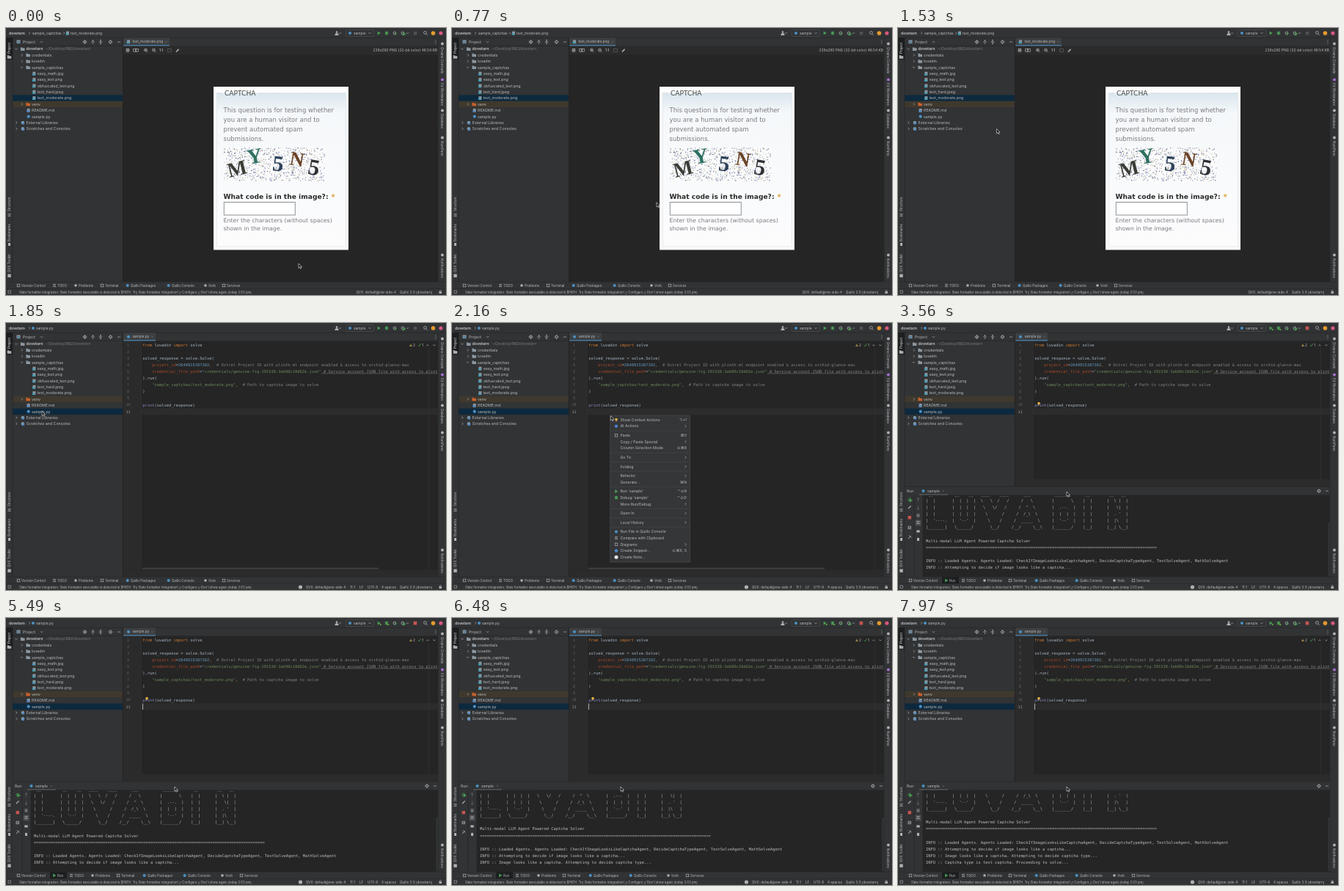
An HTML page that plays this animation: 600 px wide and 364 px high, repeating every 8 s.

```html
<!DOCTYPE html>
<html lang="en">
<head>
<meta charset="utf-8">
<title>IDE session</title>
<style>
html, body { margin: 0; width: 100%; height: 100%; overflow: hidden; background: #252525; }
svg { display: block; width: 100vw; height: 100vh; }
text { white-space: pre; font-family: Inter, "DejaVu Sans", sans-serif; }
.mono { font-family: "DejaVu Sans Mono", monospace; }
.form { font-family: "DejaVu Sans", sans-serif; }
.serif { font-family: "Liberation Serif", serif; font-weight: bold; }
.bold { font-weight: bold; }
</style>
</head>
<body>
<svg id="stage" viewBox="0 0 600 364"></svg>
<script>
const LOOP = 8000, PANEL = '#313335', EDITOR = '#252525', STRIP = '#2b2b2b', EDGE = '#232425',
      THUMB = '#3c3d3e', INK = '#bbbbbb', ICON = '#afb1b3', GREEN = '#499c54', RED = '#c75450', BLUE = '#4a88c7';
const OPEN_FILE = 1800, MENU = 2110, HOVER = 2430, RUN = 2700, OUTPUT = 3150;
const REPLIES = [6000, 7200];

// Drawing helpers; text is placed by its vertical centre.
const esc = s => s.replace(/&/g, '&amp;').replace(/</g, '&lt;');
const rect = (x, y, w, h, fill, extra = '') =>
  `<rect x="${x}" y="${y}" width="${w}" height="${h}" fill="${fill}" ${extra}/>`;
const dot = (x, y, r, fill, extra = '') => `<circle cx="${x}" cy="${y}" r="${r}" fill="${fill}" ${extra}/>`;
const line = (d, color = ICON, w = .7) => `<path d="${d}" fill="none" stroke="${color}" stroke-width="${w}"/>`;
const shape = (d, fill) => `<path d="${d}" fill="${fill}"/>`;
const text = (x, y, s, size = 5.25, fill = INK, cls = '', extra = '') =>
  `<text x="${x}" y="${y + size * .36}" font-size="${size}" fill="${fill}" class="${cls}" ${extra}>${esc(s)}</text>`;
const rightText = (x, y, s, size, fill) => text(x, y, s, size, fill, '', 'text-anchor="end"');
const turned = (x, y, angle, s, fill) =>
  `<g transform="translate(${x} ${y}) rotate(${angle})">${text(0, 0, s, 4.5, fill)}</g>`;
const group = (id, body) => `<g id="${id}">${body}</g>`;

const icons = {
  right: (x, y) => line(`M${x - .8} ${y - 1.6}l1.6 1.6l-1.6 1.6`),
  down: (x, y) => line(`M${x - 1.6} ${y - .8}l1.6 1.6l1.6 -1.6`),
  folder: (x, y, c = '#8d979f') => shape(`M${x - 2.8} ${y - 2.2}h2.2l.8 .9h2.6v3.6h-5.6z`, c),
  image: (x, y) => rect(x - 2, y - 2.4, 4, 4.8, '#8d979f') + rect(x - 2.5, y, 3.6, 2.3, '#3f9fb5'),
  python: (x, y) => dot(x, y, 2.1, '#4b8fc0'),
  doc: (x, y) => rect(x - 2, y - 2.4, 4, 4.8, '#8d979f') + rect(x - 2.5, y, 3.8, 2.2, BLUE),
  close: (x, y) => line(`M${x - 1} ${y - 1}l2 2m0 -2l-2 2`, '#6c6f71', .5),
  minus: (x, y) => line(`M${x - 2} ${y}h4`),
  ring: (x, y, c = ICON) => dot(x, y, 1.9, 'none', `stroke="${c}" stroke-width=".8"`),
  gear: (x, y) => icons.ring(x, y) + line(`M${x} ${y - 2.8}v5.6M${x - 2.8} ${y}h5.6`, ICON, .5) + dot(x, y, .8, PANEL),
  play: (x, y) => shape(`M${x - 1.8} ${y - 2.4}l4.2 2.4l-4.2 2.4z`, GREEN),
  bug: (x, y) => `<ellipse cx="${x}" cy="${y}" rx="1.8" ry="2.4" fill="${GREEN}"/>` +
    line(`M${x - 2.7} ${y - 1.3}h5.4M${x - 2.7} ${y + 1.3}h5.4`, GREEN, .5),
  box: (x, y) => rect(x - 1.8, y - 1.8, 3.6, 3.6, 'none', `stroke="${ICON}" stroke-width=".7"`),
  bars: (x, y) => line(`M${x - 2} ${y - 1.6}h4m-4 1.6h4m-4 1.6h4`),
  bulb: (x, y) => dot(x, y - .5, 1.8, '#f0b040') + rect(x - .8, y + 1.3, 1.6, 1.1, ICON),
};

function frameBars() {
  const out = [rect(0, 0, 600, 13, PANEL), rect(0, 13, 9, 333, PANEL), rect(589, 13, 11, 333, PANEL),
    rect(0, 346, 600, 18, PANEL), rect(0, 13, 9, 30, '#1d1e1f'),
    line('M0 13H600M9 13V346M589 13V346M0 346H600M0 355.3H600', EDGE, .5),
    text(4, 7, 'dovetarn', 5, INK, 'bold')];
  out.push(icons.right(32, 7), dot(451, 5.6, 1.3, ICON), shape('M448.4 10q0 -3 2.6 -3t2.6 3z', ICON), icons.down(455.5, 7),
    rect(463.5, 2.5, 38, 9, 'none', 'rx="1" stroke="#505254" stroke-width=".6"'), icons.python(469, 7),
    text(474, 7, 'sample', 4.9), icons.down(496, 7), icons.play(508.5, 7), icons.bug(519, 7),
    icons.ring(530, 7), shape('M530 6.5l3 1.6l-3 1.6z', GREEN), icons.ring(541, 7), icons.play(543, 8.3),
    icons.down(547.5, 7), icons.ring(571.5, 6.4), line('M573 8l1.8 1.8'),
    dot(582.5, 7, 2.8, '#e59a2e'), dot(593, 7, 2.6, '#d9577f'));
  out.push(turned(4.5, 35, -90, 'Project', '#eeeeee'), icons.folder(4.5, 39.5, ICON),
    turned(4.5, 250, -90, 'Structure'), icons.bars(4.5, 255), turned(4.5, 291, -90, 'Bookmarks'),
    rect(3, 293, 3, 4, ICON), turned(4.5, 333, -90, 'QVX Toolkit'), rect(2.3, 335.5, 4.4, 4.4, ICON));
  for (const [y, s] of [[26, 'Orvane Comrade'], [75, 'Ed Workmates'], [117, 'Database'], [154, 'NumPane'], [314, 'Notifications']])
    out.push(turned(595, y, 90, s), dot(595, y - 4.5, 2, y === 75 ? '#a66fd0' : ICON));
  out.push(rect(3, 358, 3.6, 3.6, 'none', `stroke="${ICON}" stroke-width=".6"`),
    text(18, 360, "Slate formatter integration: Slate formatter executable is detected in $PATH. Try Slate formatter integration! // Configure // Don't show again (today 2:03 pm)", 4.3),
    text(537, 360, 'Quillo 3.9 (dovetarn)', 4.6), rect(590.5, 359.2, 3.6, 2.8, ICON),
    line('M591.3 359v-.8q1 -1.6 2 0v.8'));
  return out.join('');
}

function projectTree() {
  const rows = [
    [0, 'dovetarn', 'open'], [1, 'credentials', 'shut'], [1, 'luvadin', 'shut'], [1, 'sample_captchas', 'open'],
    [2, 'easy_math.jpg', 'image'], [2, 'easy_text.png', 'image'], [2, 'obfuscated_text.png', 'image'],
    [2, 'text_hard.jpeg', 'image'], [2, 'text_moderate.png', 'image'], [1, 'venv', 'shut'],
    [1, 'README.md', 'doc'], [1, 'sample.py', 'python'], [0, 'External Libraries', 'shut'], [0, 'Scratches and Consoles', 'shut']];
  const rowY = i => 28.6 + 8.37 * i;
  const band = (i, color) => rect(9.3, rowY(i) - 4.2, 149.5, 8.4, color);
  let out = rect(9.2, 13.2, 150, 333, PANEL) + line('M9 24.3H159M159.3 13V346', EDGE, .6) +
    rect(14.5, 16.5, 5, 4.6, '#8d979f') + rect(15.3, 18, 3.4, 2.4, '#4f7f9f') +
    text(23, 19, 'Project', 5.1) + icons.down(48.5, 19) +
    icons.ring(107.5, 19) + line('M107.5 16v6M104.5 19h6', ICON, .5) +
    line('M116 19h5M118.5 16v2l-1 -1m1 1l1 -1M118.5 22v-2M126.5 19h5M129 16v6m-1 -5l1 -1l1 1m-2 4l1 1l1 -1') +
    icons.gear(142.5, 19) + icons.minus(154, 19) +
    group('pickImage', band(8, '#0d293e')) + group('pickCode', band(11, '#0d293e')) + band(9, '#3f392d');
  rows.forEach(([level, name, kind], i) => {
    const y = rowY(i), x = [27.5, 35, 42.7][level], root = i === 0;
    if (kind === 'open') out += icons.down(x - 13.5, y);
    if (kind === 'shut') out += icons.right(x - 13.2, y);
    if (i > 11) out += dot(x - 4.6, y, 2.3, '#7f98a8') + rect(x - 5, y, 2.6, 2.4, BLUE);
    else if (icons[kind]) out += icons[kind](x - 4.3, y);
    else out += icons.folder(x - 4.8, y, name === 'venv' ? '#c8612f' : undefined);
    out += text(x, y, name, 5.25, INK, root ? 'bold' : '');
  });
  return out + text(54, rowY(0), '~/Desktop/R&D/dovetarn', 5.2, '#77797b');
}

const editorTab = (name, icon, width) =>
  rect(160, 13.2, 429, 11.2, PANEL) + rect(160, 13.2, width, 11.2, '#3d4042') + rect(160, 23, width, 1.4, '#47789f') +
  icon(167, 18.8) + text(172.5, 18.8, name, 4.7) + icons.close(160 + width - 4.5, 18.8) +
  [17, 19, 21].map(y => dot(586, y, .5, ICON)).join('');

function captchaNoise() {
  let seed = 7, out = '';
  const rand = () => (seed = seed * 16807 % 2147483647) / 2147483647;
  const colors = ['#5664a8', '#8a93c8', '#7a9a7e', '#b09a80', '#444a70'];
  for (let i = 0; i < 850; i++) {
    const size = .5 + rand() * .7;
    out += rect((297 + rand() * 138).toFixed(1), (163 + rand() * 45).toFixed(1), size.toFixed(1), size.toFixed(1), colors[i % 5]);
  }
  return out;
}

function imageViewer() {
  const letter = (s, x, y, size, angle, color) =>
    `<g transform="translate(${x} ${y}) rotate(${angle})">${text(0, 0, s, size, color, 'serif', 'text-anchor="middle"')}</g>`;
  const form = (y, s, size = 8.5) => text(296.5, y, s, size, '#7c7c80', 'form');
  return rect(160, 24.4, 429, 322, EDITOR) + rect(160, 24.4, 429, 12, STRIP) +
    editorTab('text_moderate.png', icons.image, 63) +
    icons.box(166, 30.3) + line('M163.5 30.3h5M166 27.8v5') + [-1.5, 1.5].map(d => icons.box(177 + d, 30.3)).join('') +
    icons.ring(190.5, 30) + line('M189.4 30h2.2M190.5 28.9v2.2M192 31.6l1.5 1.5') +
    icons.ring(201.5, 30) + line('M200.4 30h2.2M203 31.6l1.5 1.5') + text(209, 30.3, '1:1', 4.3, ICON, 'bold') +
    rect(220.5, 28.5, 5, 4, 'none', 'stroke="#5b5e60" stroke-width=".7"') + line('M232 32.5l3.6 -3.6', ICON, 1.5) +
    rightText(588, 30.3, '239x290 PNG (32-bit color) 48.54 KB', 4.9) +
    rect(283, 80, 184, 222.5, '#fdfdfd') +
    rect(287.2, 88.5, 176, 209.5, 'url(#cardTint)', 'stroke="#d5dce2" stroke-width=".6"') +
    rect(295, 87.8, 49, 1.2, '#f4f8fa') + text(298, 89, 'CAPTCHA', 9.1, '#444', 'form') +
    form(112.2, 'This question is for testing whether') + form(125, 'you are a human visitor and to') +
    form(137.8, 'prevent automated spam') + form(150.6, 'submissions.') +
    rect(297, 163, 139, 46, '#fbfbfb') + captchaNoise() +
    letter('M', 315, 191, 28, -14, '#3a3c36') + letter('Y', 339, 174, 29, -10, '#2f6f60') +
    letter('5', 371, 184, 30, 6, '#2d4258') + letter('N', 397, 178, 27, 10, '#6a4326') +
    letter('5', 420, 189, 31, 10, '#2f3034') +
    text(296.5, 230, 'What code is in the image?:', 9.15, '#2a2a2a', 'form bold') +
    text(443.5, 230.5, '*', 10, '#e0a040', 'form bold') +
    rect(297.3, 237.5, 97, 17.5, '#fff', 'stroke="#8e9296" stroke-width="1"') +
    form(262, 'Enter the characters (without spaces)', 7.85) + form(273.3, 'shown in the image.', 7.85);
}

const C = { k: '#cc7832', t: '#a9b7c6', s: '#6a8759', n: '#6897bb', c: '#808080', a: '#aa4926', b: '#8888c6' };
const CODE = {
  1: [['k', 'from '], ['t', 'luvadin '], ['k', 'import '], ['t', 'solve']],
  3: [['t', 'solved_response = solve.Solve(']],
  4: [['a', '    project_id'], ['t', '='], ['n', '2640915387302'], ['k', ',  '],
    ['c', '# Ostrel Project ID with plinth-ml endpoint enabled & access to orchid-glance-max']],
  5: [['a', '    credential_file_path'], ['t', '='], ['s', '"credentials/genuine-fig-291538-3ab90c18d62e.json" '],
    ['c', '# Service account JSON file with access to plinth-ml']],
  6: [['t', ').run(']],
  7: [['s', '    "sample_captchas/text_moderate.png"'], ['k', ',  '], ['c', '# Path to captcha image to solve']],
  8: [['t', ')']],
  10: [['b', 'print'], ['t', '(solved_response)']],
};

function codeEditor() {
  const lineY = n => 29.7 + 9.1 * (n - 1);
  let out = rect(160, 24.4, 429, 322, EDITOR) + rect(160, 24.4, 24, 312, STRIP) +
    rect(184, lineY(11) - 4.5, 405, 9.1, '#2c2c2c') + rect(186, 333.5, 322, 2.4, THUMB) +
    rect(160, 336.5, 429, 9.5, STRIP) + line('M184.3 24.4V336.5M576.3 24.4V336.5', '#393a3b', .5);
  for (let n = 1; n <= 11; n++) {
    out += text(n < 10 ? 165 : 163.5, lineY(n), String(n), 5, n === 11 ? '#a4a3a3' : '#606366', 'mono');
    const spans = (CODE[n] || []).map(([c, s]) => `<tspan fill="${C[c]}">${esc(s)}</tspan>`).join('');
    out += `<text x="186.3" y="${lineY(n) + 1.9}" font-size="5.4" class="mono">${spans}</text>`;
  }
  return out + line('M430 68.8H589', '#77776c', .6) +
    rect(545, 25.5, 43, 9, EDITOR) + shape('M550 32l2 -3.8l2 3.8z', '#8f8145') + text(555, 30.3, '2', 4.8) +
    line('M562 30.3l1.4 1.5l2.2 -3.4', GREEN, .9) + text(567, 30.3, '1', 4.8) +
    line('M573.5 31.2l1.5 -1.6l1.5 1.6') + icons.down(584, 30.3) +
    group('caret', rect(186, lineY(11) - 4.2, .8, 8.5, '#d0d0d0')) + editorTab('sample.py', icons.python, 44);
}

function contextMenu() {
  const items = [
    [132, 'Show Context Actions', '⌥⏎', icons.bulb], [140.6, 'AI Actions', '>', (x, y) => dot(x, y, 2.2, '#4d7fd6')],
    [153.2, 'Paste', '⌘V', icons.box], [161.8, 'Copy / Paste Special', '>'], [170.5, 'Column Selection Mode', '⇧⌘8'],
    [183.3, 'Go To', '>'], [195.8, 'Folding', '>'], [208.3, 'Refactor', '>'], [217, 'Generate...', '⌘N'],
    [229.5, "Run 'sample'", '⌃⇧R', icons.play], [238.2, "Debug 'sample'", '⌃⇧D', icons.bug], [246.8, 'More Run/Debug', '>'],
    [259.4, 'Open In', '>'], [272, 'Local History', '>'], [284.5, 'Run File in Quillo Console', '', icons.python],
    [293, 'Compare with Clipboard', '', icons.bars], [301.8, 'Diagrams', '>', icons.box],
    [310.5, 'Create Snippet...', '⇧⌘X, S', (x, y) => dot(x, y, 2.3, BLUE)], [319.2, 'Create Note...', '', (x, y) => dot(x, y, 2.5, '#e6e6e6')]];
  let out = rect(215.8, 126, 108.5, 200, '#343638', 'stroke="#505254" stroke-width=".6"') +
    group('hover', rect(216, 225.2, 108, 8.6, '#4b6eaf'));
  items.forEach(([y, name, hint, icon], i) => {
    if (i && y - items[i - 1][0] > 10) out += line(`M216 ${y - 6.3}H324`, '#4a4c4e', .5);
    if (icon) out += icon(224, y);
    out += text(229.5, y, name, 5.2) + (hint === '>' ? icons.right(318.5, y) : rightText(320, y, hint, 5.1));
  });
  return out;
}

const ART = String.raw`
 __; __    __;____    ____;     ___; _______; __;.__   __.
|  |;|  |  |  |;\   \  /   /;    /   \;|       \;|  |;|  \ |  |
|  |;|  |  |  |; \   \/   /;   /  ^  \;|  .--.  |;|  |;|   \|  |
|  |;|  |  |  |;  \      /;  /  /_\  \;|  |  |  |;|  |;|  . '  |
|  '----.;|  '--'  |;   \    /; /  _____  \;|  '--'  |;|  |;|  |\   |
|_______|; \______/;    \__/;/__/     \__\;|_______/;|__|;|__| \__|`
  .slice(1).split('\n').map(row => row.split(';').map((cell, i) => cell.padEnd([11, 12, 13, 17, 13, 10, 10][i])).join(''));
const LOG = [...ART, '', 'Multi-modal LLM Agent Powered Captcha Solver', '='.repeat(97), '',
  'INFO :: Loaded Agents. Agents Loaded: CheckIfImageLooksLikeCaptchaAgent, DecideCaptchaTypeAgent, TextSolveAgent, MathSolveAgent',
  'INFO :: Attempting to decide if image looks like a captcha...',
  'INFO :: Image looks like a captcha. Attempting to decide captcha type...',
  'INFO :: Captcha type is text captcha. Proceeding to solve...'];
const LOG_PITCH = 9.15, FIRST_COUNT = LOG.length - REPLIES.length;

function runPanel() {
  return rect(160, 213, 429, 10, STRIP) +
    rect(9.2, 223, 579.8, 123, PANEL) + line('M9 223H589', EDGE, .6) + rect(33.5, 234.5, 555.5, 111.5, EDITOR) +
    text(12, 229, 'Run:', 5) + rect(29, 233.2, 39, 1.3, '#565a5d') +
    icons.python(34.5, 229) + text(40, 229, 'sample', 5) + icons.close(62, 229) +
    icons.gear(574, 229) + icons.minus(585, 229) + line('M22 234.5V346', EDGE, .6) +
    icons.ring(15.8, 241, GREEN) + icons.play(17.5, 242) + line('M14 253l3.6 -3.6', ICON, 1.2) +
    rect(13.6, 263, 4.4, 4.4, RED) + icons.box(15.8, 279) + line('M14 279h3.6') +
    line('M14 294l3.6 -3.6M15 289.5l3 3', ICON, 1) +
    line('M27.5 243.5v-5m-1.6 1.6l1.6 -1.6l1.6 1.6M27.5 249.5v5m-1.6 -1.6l1.6 1.6l1.6 -1.6', '#6c6f71') +
    icons.bars(27.5, 262.5) + rect(23.5, 268.5, 8, 8, '#4a4d4f') + icons.bars(27.5, 272) +
    rect(25.3, 282.5, 4.4, 3, ICON) + rect(26, 293, 3, 4, ICON) + rect(586.4, 272, 2.4, 73, '#333435') +
    `<g clip-path="url(#consoleClip)">${group('log',
      LOG.map((s, i) => text(38, i * LOG_PITCH, s, 5.4, '#bbbbbb', 'mono')).join(''))}</g>` +
    icons.bulb(192, 110) + rect(555.7, 4.7, 4.6, 4.6, RED) +
    dot(510.8, 9, 1.1, '#62b543') + dot(521.3, 9, 1.1, '#62b543');
}

const tools = (xs, names) => names.map((s, i) =>
  (s === 'Run' ? rect(60, 346.2, 23, 9, '#1d1e1f') + icons.play(66, 351) :
    s === 'Problems' || s === 'Vorb' ? dot(xs[i] - 4, 351, 1.8, ICON) : s === 'TODO' ? icons.bars(xs[i] - 4, 351) :
    s.startsWith('Quillo') ? icons.python(xs[i] - 4.3, 351) : icons.box(xs[i] - 4, 351)) + text(xs[i], 351, s, 4.5)).join('');
const TOOL_NAMES = ['Version Control', 'TODO', 'Problems', 'Terminal', 'Quillo Packages', 'Quillo Console', 'Vorb', 'Services'];
const CLOUD = 'QVX: default@nw-side-4';

const stage = document.getElementById('stage');
stage.innerHTML = `<defs>
  <linearGradient id="cardTint" x2="0" y2="1"><stop stop-color="#d9e6ed"/><stop offset=".13" stop-color="#f5f8fa"/><stop offset="1" stop-color="#fcfcfd"/></linearGradient>
  <clipPath id="consoleClip"><rect x="34" y="235.6" width="552" height="110"/></clipPath></defs>` +
  group('image', imageViewer()) + group('code', codeEditor()) + projectTree() + frameBars() +
  group('imageBars', text(36, 7, 'sample_captchas', 4.85) + icons.right(79, 7) + icons.image(84, 7) +
    text(88, 7, 'text_moderate.png', 4.85) + text(477.5, 360, CLOUD, 4.6)) +
  group('codeBars', icons.python(37, 7) + text(41, 7, 'sample.py', 4.9) + dot(401.5, 360, 2.6, ICON) +
    [[409, CLOUD], [469, '11:1'], [482, 'LF'], [493, 'UTF-8'], [512, '4 spaces']].map(([x, s]) => text(x, 360, s, 4.6)).join('')) +
  group('idle', rect(556, 5, 4.2, 4.2, '#505355') + tools([21, 70, 99, 135, 170, 226, 276, 301], TOOL_NAMES)) +
  group('busy', runPanel() + tools([21, 70, 93, 122, 157, 193, 248, 299, 325], ['Version Control', 'Run', ...TOOL_NAMES.slice(1)])) +
  group('menu', contextMenu()) +
  group('pointer', '<path d="M0 0V6.3L1.5 5L2.5 7.2L3.6 6.7L2.6 4.6H4.6Z" fill="#111" stroke="#eee" stroke-width=".6"/>');

const node = id => document.getElementById(id);
const show = (id, on) => node(id).setAttribute('visibility', on ? 'visible' : 'hidden');
const logRows = [...node('log').children];

const PATH = [[100, 399, 321], [1530, 134.5, 137.5], [1690, 48, 120], [1840, 48, 120],
  [2080, 216.3, 126.5], [2200, 216.3, 126.5], [2480, 230, 230]];
function pointerAt(t) {
  const next = PATH.findIndex(p => p[0] > t);
  if (next <= 0) return (next ? PATH[PATH.length - 1] : PATH[0]).slice(1);
  const [t0, x0, y0] = PATH[next - 1], [t1, x1, y1] = PATH[next];
  const u = (t - t0) / (t1 - t0), e = u * u * (3 - 2 * u);
  return [x0 + (x1 - x0) * e, y0 + (y1 - y0) * e];
}

function draw(now) {
  const t = now % LOOP, coding = t >= OPEN_FILE, running = t >= RUN, menu = t >= MENU && !running;
  for (const id of ['image', 'imageBars', 'pickImage']) show(id, !coding);
  for (const id of ['code', 'codeBars', 'pickCode']) show(id, coding);
  show('idle', !running);
  show('busy', running);
  show('menu', menu);
  show('hover', menu && t >= HOVER);
  show('caret', coding && !menu && (t + 40) % 1000 < 545);
  const count = t < OUTPUT ? 0 : FIRST_COUNT + REPLIES.filter(r => t >= r).length;
  logRows.forEach((row, i) => row.setAttribute('display', i < count ? 'inline' : 'none'));
  node('log').setAttribute('transform', `translate(0 ${333.2 - (count - 1) * LOG_PITCH})`);
  node('pointer').setAttribute('transform', `translate(${pointerAt(t)})`);
  requestAnimationFrame(draw);
}
draw(0);
</script>
</body>
</html>
```
